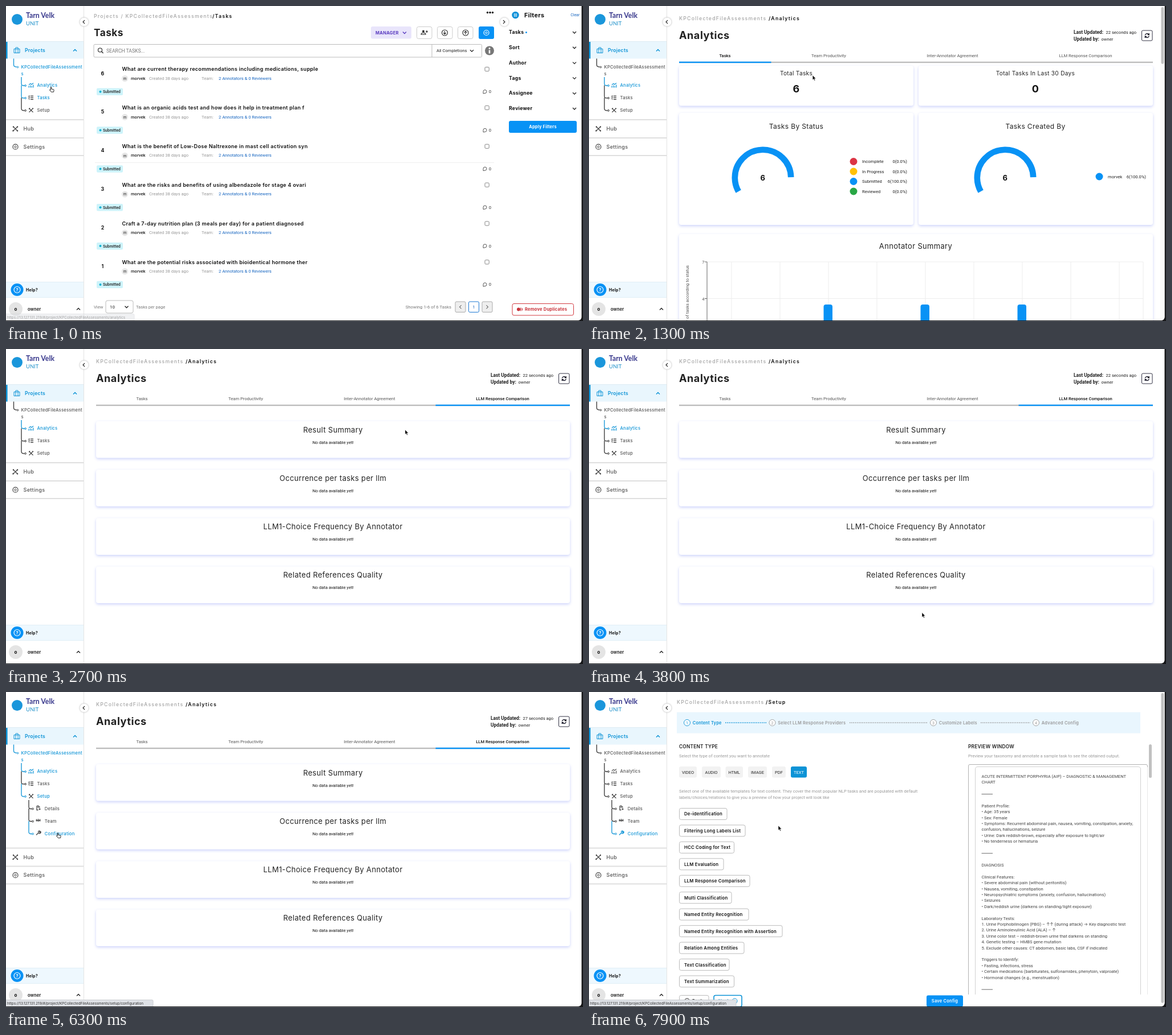
Animation of 1012 by 554 pixels, one loop 8000 ms. Source, as an HTML page:

```html
<!DOCTYPE html>
<html lang="en">
<head>
<meta charset="utf-8">
<title>Project analytics</title>
<style>
html, body { margin: 0; width: 100%; height: 100%; overflow: hidden; background: #17181a; }
svg { display: block; }
.m { font-family: Inter, sans-serif; letter-spacing: .03em; }
.r { font-family: Roboto, Inter, sans-serif; }
.l { font-family: Lato, sans-serif; }
.b { font-family: Inter, sans-serif; letter-spacing: 1.25px; font-size: 8.7px; }
.card { fill: #fff; filter: drop-shadow(0 2px 2.5px #ccd2fb); }
.blur { filter: blur(.9px); }
</style>
</head>
<body>
<svg id="stage" width="1012" height="554" viewBox="0 0 1012 554"></svg>
<script>
const PROJECT = 'KPCollectedFileAssessments', USER = 'morvek', OWNER = 'owner';
const BLUE = '#0892f5', LINK = '#0d93d6', INK = '#222', GREY = '#555', PALE = '#999';
const clamp = v => Math.max(0, Math.min(1, v));
const ease = v => v * v * (3 - 2 * v);

// y is the middle of the capitals
const text = cls => (x, y, s, size = 7.6, fill = INK, weight = 400, anchor = 'start') =>
  `<text class="${cls}" x="${x}" y="${y + size * .36}" font-size="${size}" fill="${fill}" font-weight="${weight}" text-anchor="${anchor}">${s}</text>`;
const M = text('m'), R = text('r'), L = text('l');
const box = (x, y, w, h, fill = '#fff', stroke = 'none', rx = 3, sw = 1) =>
  `<rect x="${x}" y="${y}" width="${w}" height="${h}" rx="${rx}" fill="${fill}" stroke="${stroke}" stroke-width="${sw}"/>`;
const dot = (x, y, r, fill, stroke = 'none', sw = 1) =>
  `<circle cx="${x}" cy="${y}" r="${r}" fill="${fill}" stroke="${stroke}" stroke-width="${sw}"/>`;
const line = (d, c = INK, w = 1, x = 0, y = 0, more = '') =>
  `<path d="${d}" fill="none" stroke="${c}" stroke-width="${w}" transform="translate(${x} ${y})" ${more}/>`;
const chevron = (x, y, turn = 0, c = INK, w = 1.3) =>
  `<path d="M-3-1.5 0 1.5 3-1.5" fill="none" stroke="${c}" stroke-width="${w}" transform="translate(${x} ${y}) rotate(${turn})"/>`;
const card = (x, y, w, h) => `<rect class="card" x="${x}" y="${y}" width="${w}" height="${h}" rx="4"/>`;
const list = (items, f) => items.map(f).join('');
const crumb = (x, y, path, nowX, now) =>
  `<text class="b" y="${y + 3.1}" font-weight="500"><tspan x="${x}" fill="#a5a5a5">${path}</tspan><tspan x="${nowX}" fill="#111" font-weight="600">/${now}</tspan></text>`;
const roundButton = (x, turn) =>
  `<circle cx="${x}" cy="28" r="7.5" fill="#fff" style="filter:drop-shadow(0 0 1.5px #aaa)"/>` + chevron(x - .5, 28, turn, INK, 1.1);

const ICONS = {
  bag: 'M-5-2.5h10v7h-10zM-2-2.5v-2.5h4v2.5M-2-2.5v7M2-2.5v7',
  chart: 'M-4 4v-3M-1.3 4v-4M1.3 4v-3M4 4v-5M-4-1-1-3 1-1.5 4-4',
  tasks: 'M-1-3h5M-1 0h5M-1 3h5M-4.5-3l.8.8 1.2-1.6M-4.5 0l.8.8 1.2-1.6M-4 3h1.3',
  tools: 'M-3.5-3.5 3.5 3.5M3.5-3.5-3.5 3.5M-4-2l2-2M2.5-4 4-2.5',
  hub: 'M0 0-3.5-3.5M0 0 3.5-3.5M0 0-4 3.5M0 0 3.5 3.5M-1 0h2',
  file: 'M-2.5-3.5h3l2 2v1M-2.5-3.5v7h2.5M-1-1h2M1 2h3M2.5.5v3',
  team: 'M-3-2.5v4M0-3v5M3-2.5v4M-4 0h8',
  wrench: 'M-3.5 3.5 1-1M0-1.5A2 2 0 0 1 3-3.5L2-2 3-1 4.2-2.5A2 2 0 0 1 1 0',
  sync: 'M-3.5-.5A3.5 3.5 0 0 1 2.8-2M3.5-4v2.5h-2.5M3.5.5A3.5 3.5 0 0 1-2.8 2M-3.5 4v-2.5h2.5',
};
const icon = (name, x, y, c = GREY, w = 1.2) => line(ICONS[name], c, w, x, y);
const gear = (x, y, c) => dot(x, y, 4.5, 'none', c, 1.2) + dot(x, y, 1.7, 'none', c);

const TITLES = [
  'What are current therapy recommendations including medications, supple',
  'What is an organic acids test and how does it help in treatment plan f',
  'What is the benefit of Low-Dose Naltrexone in mast cell activation syn',
  'What are the risks and benefits of using albendazole for stage 4 ovari',
  'Craft a 7-day nutrition plan (3 meals per day) for a patient diagnosed',
  'What are the potential risks associated with bioidentical hormone ther'];

function taskRow(title, i) {
  const y = 111 + 67.85 * i;
  return M(169.5, y + 7.5, 6 - i, 8.7, '#111', 700, 'middle') + M(203.5, y, title, 9.08, '#111', 600) +
    dot(208.5, y + 16.5, 5.5, '#e6e6e6') + R(208.5, y + 16.5, USER[0], 6.5, INK, 400, 'middle') +
    R(219, y + 16, USER, 7.6, INK, 500) + R(251, y + 16, 'Created 38 days ago', 7.6, PALE) +
    R(343, y + 16, 'Team:', 7.6, PALE) + R(373, y + 16, '2 Annotators &amp; 0 Reviewers', 7.6, '#1565c0') +
    box(159, y + 33.5, 46, 12.5, '#cdf3fa', 'none', 2) + dot(165.5, y + 39.7, 2, '#10b3d4') +
    R(170, y + 39.7, 'Submitted', 6.7, INK, 500) + box(840, y - 3.5, 7.2, 7.2, '#fff', '#666', 1.5, .8) +
    line('M-3 3.3v-3.5a3 3 0 1 1 3 3z', '#444', .9, 840, y + 39.7) + R(847, y + 39.7, '0', 7);
}

function tasksPage() {
  return crumb(154, 17.5, 'Projects / ' + PROJECT, 362, 'Tasks') + M(154, 47, 'Tasks', 17.2, INK, 700) +
    list([844.5, 849, 853.5], x => dot(x, 11.5, 1.7, '#111')) +
    box(640, 36, 71, 21.5, '#e9e5fb') + M(648, 46.8, 'MANAGER', 7.6, '#5a3cc0', 700) + chevron(699, 47, 0, '#5a3cc0') +
    list([720.5, 756.5, 792.5], x => box(x, 36.5, 26.5, 21, '#fff', '#ccc')) +
    dot(732, 44.5, 2, INK) + line('M-4 4a4 3 0 0 1 8 0zM4-1h4M6-3v4', INK, 1.2, 732, 46) +
    list([[769.5, 0], [806, 180]], ([x, a]) => dot(x, 47, 5, 'none', INK, 1.1) +
      line('M0-3v5.5M-2.5.2 0 2.7 2.5.2', INK, 1.1, x, 47, `style="transform:translate(${x}px,47px) rotate(${a}deg)"`)) +
    box(829, 36, 27, 22, BLUE) + gear(842.5, 47, '#fff') +
    box(154, 67.5, 680.5, 22.5, '#fff', '#bbb', 2) + line('M747 67.5v22.5', '#bbb') +
    dot(165, 77.5, 3.5, 'none', INK, 1.1) + line('M167.5 80l3 3', INK, 1.2) +
    R(176, 78.7, 'SEARCH TASKS...', 8.6, '#777') + R(755, 78.7, 'All Completions') + chevron(817, 78.7) +
    dot(848, 78.5, 8, '#777') + box(846.7, 77.5, 2.6, 6, '#fff', 'none', 0) + dot(848, 74.5, 1.5, '#fff') +
    line('M156 275.5H856', '#eee') + list(TITLES, taskRow) +
    R(154, 529, 'View', 7.6, '#777') + box(175, 518, 48, 22, '#fff', '#bbb') + R(182, 529, '10', 8) + chevron(211.5, 529.3) +
    R(228, 529, 'Tasks per page', 7.6, '#777') + R(781, 529, 'Showing 1-6 of 6 Tasks', 7.8, '#777', 400, 'end') +
    list([[788, '#eee', '#aaa'], [811.5, '#fff', '#1976d2'], [835, '#eee', '#aaa']], ([x, f, s]) => box(x, 520, 18, 18.5, f, s, 2)) +
    chevron(797, 529.3, 90, INK, 1) + R(820.5, 529.3, '1', 8, '#1565c0', 400, 'middle') + chevron(844, 529.3, -90, INK, 1) +
    roundButton(874, -90) + dot(893.5, 16, 6.2, '#0a8fd8') + line('M-2-3v6M0-3v6M2-3v6', '#fff', .9, 893.5, 16) +
    M(909, 16, 'Filters', 10.8, '#111', 700) + R(1006, 16, 'Clear', 6.8, '#1565c0', 400, 'end') +
    list(['Tasks', 'Sort', 'Author', 'Tags', 'Assignee', 'Reviewer'], (s, i) =>
      M(882, 46 + 26.8 * i, s, 8.7, '#111', 700) + chevron(997, 46.5 + 26.8 * i)) +
    dot(912.5, 46.5, 1.4, BLUE) + box(882, 202, 119, 21, BLUE) + M(941.5, 212.5, 'Apply Filters', 7.4, '#fff', 700, 'middle') +
    box(888, 523.5, 107.5, 20.5, '#fff', '#d23a40') + dot(899, 533.5, 3, '#c9323a') +
    line('M903 530.5v6M905.5 531.5v4', '#c9323a', 1.2) + M(910, 533.7, 'Remove Duplicates', 7.5, '#c9323a', 700);
}

const TABS = [['Tasks', 238.5], ['Team Productivity', 420.5], ['Inter-Annotator Agreement', 637.5], ['LLM Response Comparison', 871]];

function analyticsHead(active, y = 87.5) {
  return crumb(158, 21.5, PROJECT, 315, 'Analytics') + M(158, 51.3, 'Analytics', 18.1, INK, 700) +
    list(TABS, ([s, x], i) => R(x, y, s, 7.6, i == active ? '#111' : GREY, i == active ? 500 : 400, 'middle')) +
    box(158, y + 10.3, 831, 2.4, '#bcbcbc', 'none', 0) +
    (active ? box(753.5, y + 10.3, 235.5, 2.4, BLUE, 'none', 0) : box(158, y + 10.3, 161.5, 2.4, BLUE, 'none', 0));
}

function updated(t) {
  return R(850, 45.5, 'Last Updated:', 8.4, INK, 700) + R(906.5, 45.8, `${t < 5800 ? 22 : 27} seconds ago`) +
    R(850, 58, 'Updated by:', 8.4, INK, 700) + R(898.5, 58, OWNER) +
    box(969.5, 43, 18.5, 18, '#fff', '#334', 2) + icon('sync', 978.8, 52, '#112', 1.3);
}

function loadingPage() {
  return analyticsHead(0, 86.5) + card(158, 186, 831, 84.5) + '<g class="blur">' +
    M(573, 165, 'Label Frequency', 8.5, INK, 600, 'middle') + M(573, 228, 'Tasks Summary', 12.4, GREY, 500, 'middle') +
    M(573, 253.5, 'No matching data found', 12.5, GREY, 500, 'middle') + R(927, 201.5, 'Select Annotator', 6.2, GREY) +
    chevron(980, 201, 0, '#888', 1) + '</g>' + list([562, 570.5, 578.8], x => box(x, 194, 6, 8.2, '#0d86c8', 'none', 0));
}

const STATUS = [['Incomplete', '0(0.0%)', '#dc3545'], ['In Progress', '0(0.0%)', '#ffc107'],
  ['Submitted', '6(100.0%)', BLUE], ['Reviewed', '0(0.0%)', '#28a745']];

const donut = (x, p) => `<circle r="49.2" pathLength="100" fill="none" stroke="${BLUE}" stroke-width="10.6"
  stroke-dasharray="${99.35 * p} 100" transform="translate(${x} 302) scale(1 -1) rotate(1)"/>` +
  M(x, 302, '6', 13, '#111', 700, 'middle');

function statsPage(t) {
  const p = ease(clamp((t - 800) / 900));
  return card(158, 105, 411, 70.5) + card(578, 105, 411, 70.5) + analyticsHead(0) + updated(t) +
    M(363.5, 118.5, 'Total Tasks', 10.1, INK, 400, 'middle') + M(363.5, 146, '6', 18, '#111', 700, 'middle') +
    M(783, 118.5, 'Total Tasks In Last 30 Days', 10.1, INK, 400, 'middle') + M(783, 146, '0', 18, '#111', 700, 'middle') +
    card(158, 188, 411, 197) + card(578, 188, 411, 197) +
    M(363.5, 212, 'Tasks By Status', 12, INK, 400, 'middle') + M(783, 212, 'Tasks Created By', 12, INK, 400, 'middle') +
    donut(305, p) + donut(730, p) +
    list(STATUS, ([s, n, c], i) => dot(464, 273.5 + 17.5 * i, 6.5, c) + R(479, 273.5 + 17.5 * i, s) +
      R(558, 273.5 + 17.5 * i, n, 7.6, INK, 400, 'end')) +
    dot(895, 300, 6.5, BLUE) + R(910, 300, USER) + R(977, 300, '6(100.0%)', 7.6, INK, 400, 'end') +
    card(158, 401, 831, 170) + M(573, 422.5, 'Annotator Summary', 12.9, INK, 400, 'middle') +
    line('M207 450H972M207 514.5H972' + list([...Array(9).keys()], i => `M${250 + 85 * i} 450V554`) + 'M972 450V554', '#ededed') +
    line('M203 450h4V554M203 514.5h4', '#666') +
    R(202.5, 450.3, '7', 7.6, GREY, 400, 'end') + R(202.5, 514.8, '4', 7.6, GREY, 400, 'end') +
    list([411.5, 581.5, 751.5], x => box(x, 600 - 128.7 * p, 15.5, 140, BLUE, 'none', 4)) +
    `<g transform="translate(172 456) rotate(-90)">${R(0, 0, 'Number of tasks according to status', 7.6, GREY, 400, 'end')}</g>`;
}

function comparisonPage(t) {
  return analyticsHead(3) + updated(t) +
    list(['Result Summary', 'Occurrence per tasks per llm', 'LLM1-Choice Frequency By Annotator', 'Related References Quality'], (s, i) => {
      const y = 127 + 85.2 * i;
      return card(158, y, 831, 64.5) + M(573.5, y + 15, s, 12.9, INK, 400, 'middle') +
        R(573.5, y + 37, 'No data available yet!', 7.6, '#111', 400, 'middle');
    });
}

const STEPS = [['Content Type', 172, 239, 312], ['Select LLM Response Providers', 321.5, 457, 594],
  ['Customize Labels', 604, 687, 774], ['Advanced Config', 784, 0, 0]];
const KINDS = [['VIDEO', 158, 31], ['AUDIO', 198, 33], ['HTML', 239.5, 30.5], ['IMAGE', 279, 33], ['PDF', 321, 24], ['TEXT', 354, 28]];
const TEMPLATES = [['De-identification', 242], ['Filtering Long Labels List', 274], ['HCC Coding for Text', 254.5],
  ['LLM Evaluation', 236], ['LLM Response Comparison', 282], ['Multi Classification', 250], ['Named Entity Recognition', 280],
  ['Named Entity Recognition with Assertion', 339], ['Relation Among Entities', 272], ['Text Classification', 246], ['Text Summarization', 254.5]];
const PREVIEW = `ACUTE INTERMITTENT PORPHYRIA (AIP) – DIAGNOSTIC &amp; MANAGEMENT
CHART

---

Patient Profile:
• Age: 35 years
• Sex: Female
• Symptoms: Recurrent abdominal pain, nausea, vomiting, constipation, anxiety,
confusion, hallucinations, seizure
• Urine: Dark reddish-brown, especially after exposure to light/air
• No tenderness or hematuria

---

DIAGNOSIS

Clinical Features:
• Severe abdominal pain (without peritonitis)
• Nausea, vomiting, constipation
• Neuropsychiatric symptoms (anxiety, confusion, hallucinations)
• Seizures
• Dark/reddish urine (darkens on standing/light exposure)

Laboratory Tests:
1. Urine Porphobilinogen (PBG) – ↑↑ (during attack) → Key diagnostic test
2. Urine Aminolevulinic Acid (ALA) – ↑
3. Urine color test – reddish-brown urine that darkens on standing
4. Genetic testing – HMBS gene mutation
5. Exclude other causes: CT abdomen, basic labs, CSF if indicated

Triggers to Identify:
• Fasting, infections, stress
• Certain medications (barbiturates, sulfonamides, phenytoin, valproate)
• Hormonal changes (e.g., menstruation)

---`.split('\n');

function previewLine(s, i) {
  const y = 148 + 10.41 * i;
  return s == '---' ? line('M0 0h19.5', '#444', .8, 688.5, y + .4) : R(688.5, y, s, 7.6, '#444');
}

function setupPage() {
  return crumb(154, 17.5, PROJECT, 310, 'Setup') + box(154, 35.5, 813, 37, '#e9f6fe', 'none', 0) +
    list(STEPS, ([s, x, from, to], i) => {
      const c = i ? PALE : LINK;
      return dot(x, 54, 5.5, '#fff', c, .9) + R(x, 54, i + 1, 7, c, 400, 'middle') + M(x + 9.8, 54, s, 7.4, c, 600) +
        (to ? line(`M${from} 54H${to}`, c, 1.5, 0, 0, 'stroke-dasharray="1.6 1.6"') : '');
    }) +
    M(158, 96, 'CONTENT TYPE', 8.3, INK, 600) + R(158, 112.5, 'Select the type of content you want to annotate', 7.6, PALE) +
    list(KINDS, ([s, x, w], i) => box(x, 131, w, 19.5, i == 5 ? LINK : '#f2f2f2') +
      R(x + w / 2, 141, s, 7.5, i == 5 ? '#fff' : INK, 400, 'middle')) +
    R(158, 174, 'Select one of the available templates for text content. They cover the most popular NLP tasks and are populated with default', 7.6, PALE) +
    R(158, 185, 'labels/choices/relations to give you a preview of how your project will look like', 7.6, PALE) +
    list(TEMPLATES, ([s, end], i) => box(158.5, 204.5 + 29.45 * i, end - 158.5, 20, '#fff', '#bbb') +
      M(167, 214.7 + 29.45 * i, s, 7.75, '#111', 600)) +
    box(158.5, 533.5, 51.5, 20, '#fff', '#bbb') + dot(172, 543.5, 4.5, 'none', INK) + M(181, 543.5, 'Back', 7.6, INK, 600) +
    box(219, 533.5, 49, 20, '#fff', LINK, 3, 1.6) + M(227, 543.5, 'Next', 7.6, LINK, 600) + dot(255.5, 543.5, 4.5, 'none', LINK) +
    box(592, 533.5, 64, 20, BLUE) + M(624, 543.7, 'Save Config', 7.5, '#fff', 600, 'middle') +
    M(665, 96, 'PREVIEW WINDOW', 8.3, INK, 600) +
    R(665, 112.5, 'Preview your taxonomy and annotate a sample task to see the obtained output.', 7.6, PALE) +
    line('M665.5 532V130q0-2.5 2.5-2.5H977q2.5 0 2.5 2.5V132', '#aaa', .9) +
    line('M677.5 532V136q0-4.5 4.5-4.5H963q4.5 0 4.5 4.5V532', '#ccc', .9) + line('M979.5 132V532', '#e8e8e8') +
    list(PREVIEW, previewLine) + box(982, 92, 5, 59, '#c1c1c1', 'none', 2.5);
}

// A branch is coloured together with the trunk piece above it
const branch = (x, from, y, c) => line(`M${x} ${from}V${y - 3}q0 3.5 4 3.5h1.5`, c, 1.3) + dot(x + 7, y + .5, 1.4, '#fff', c, 1);

function sidebar(t, hover) {
  const on = v => v ? LINK : GREY;
  const tree = v => v ? LINK : '#333';
  const open = ease(clamp((t - 5000) / 400)), drop = 74.5 * open;
  const items = [['Analytics', 'chart', t < 7100], ['Tasks', 'tasks', t < 300], ['Setup', 'tools', hover && t >= 5100]];
  const subs = [['Details', 'file', false], ['Team', 'team', false], ['Configuration', 'wrench', t >= 6100]];
  const rule = y => box(0, y - 1, 136, 2, '#dfdfdf', 'none', 0);
  return box(0, 0, 136, 553, '#fff', 'none', 0) + line('M136.5 0V553', '#e4e4e4') +
    dot(19.5, 23.5, 9.5, '#1a96db') + L(35, 17, 'Tarn Velk', 12.3, '#38388c', 700) + L(35, 30.3, 'UNIT', 9.4, '#1b8fc9') +
    roundButton(137, 90) +
    box(0, 62, 136, 30.5, '#e9f6fd', 'none', 0) + line('M0 62.5H136', '#dcebf3') + box(0, 63, 2.6, 29.5, LINK, 'none', 0) +
    icon('bag', 19, 78, LINK, 1) + M(33, 78, 'Projects', 8.6, LINK, 600) + chevron(121, 78, 180, LINK, 1.5) +
    line('M13.5 92.5V103q0 4 4 4h1', tree(hover), 1.3) + dot(20.5, 107.5, 1.3, '#fff', tree(hover)) +
    M(26.5, 107.3, PROJECT.slice(0, -1), 7.6, on(hover), 500) + M(26.5, 119, PROJECT.slice(-1), 7.6, on(hover), 500) +
    list(items, ([s, name, lit], i) => {
      const y = 139.5 + 21.9 * i;
      return branch(27, i ? y - 22 : 125, y, tree(lit)) + icon(name, 44, y, i ? '#333' : on(lit)) + M(54.5, y, s, 7.6, on(lit), 500);
    }) +
    `<clipPath id="fold"><rect y="190" width="136" height="${drop + 4 * open}"/></clipPath><g clip-path="url(#fold)">` +
    list(subs, ([s, name, lit], i) => {
      const y = 205 + 22 * i;
      return branch(40, i ? y - 22 : 190, y, tree(lit)) + icon(name, 56.5, y - 1, i == 2 && t >= 7100 ? LINK : '#444', 1.3) +
        M(67.8, y, s, 7.6, on(lit), 500);
    }) + '</g>' +
    `<g transform="translate(0 ${drop})">` + rule(200) + rule(232) + rule(263) +
    icon('hub', 16.5, 216, '#444') + list([[13, 212.5], [20, 212.5], [12.5, 219.5], [20, 219.5]], ([x, y]) => dot(x, y, 1.2, '#444')) +
    M(30.5, 216, 'Hub', 9.1, GREY, 500) + gear(16.5, 247.7, '#444') + M(30.5, 247.7, 'Settings', 9.1, GREY, 500) + '</g>' +
    box(0, 485, 136, 27.5, '#eef8fe', 'none', 0) + line('M0 485.5H136M0 512.5H136', '#e0eef6') +
    dot(19.5, 499, 11, BLUE) + dot(19.5, 499, 5.5, 'none', '#fff', 1.2) + M(19.6, 499, '?', 8, '#fff', 700, 'middle') +
    M(35, 499, 'Help?', 7.1, '#111', 700) + dot(17, 533, 12, '#e4e4e4') + M(17, 533, OWNER[0], 8, '#111', 700, 'middle') +
    M(38, 533, OWNER, 7.4, '#111', 600) + chevron(127, 533, 180);
}

function statusBar(t) {
  if (t >= 1200 && t < 6200) return '';
  const late = t >= 6200, w = late ? 258 : 225;
  const opacity = late ? 1 : Math.min(1, .45 + t / 300);
  return `<g opacity="${opacity}">` + box(-3, 541.5, w + 3, 15, '#dee1e6', '#c4c7cc', 2, .8) +
    `<text x="2" y="549.8" font-family="Inter, sans-serif" font-size="6.3" fill="#333">https://13.127.131.219/#/project/${PROJECT}/${late ? 'setup/configuration' : 'analytics'}</text></g>`;
}

const PATH = [[0, 79, 142], [900, 79, 142], [1800, 830, 93.5], [2300, 830, 93.5], [2700, 700, 142], [3100, 408, 165], [3400, 600, 298],
  [3600, 480, 230], [3800, 584, 463.5], [3900, 600, 488], [4000, 641, 447], [4100, 641, 447], [5000, 64, 181], [5700, 64, 181],
  [6200, 91, 247.5], [7400, 91, 247.5], [7900, 332, 235], [8000, 332, 235]];

function pointer(t) {
  const i = PATH.findIndex(k => k[0] > t), [t0, x0, y0] = PATH[i - 1], [t1, x1, y1] = PATH[i];
  const p = ease((t - t0) / (t1 - t0));
  return [x0 + (x1 - x0) * p, y0 + (y1 - y0) * p];
}

function cursor(t, x, y) {
  const hand = t < 1000 || t >= 1700 && t <= 2300 || t >= 4900 && t < 7500;
  const ring = t >= 2000 && t < 2300 ? dot(x + 1, y + .5, 17, 'none', INK, 1.3) : '';
  return ring + (hand
    ? `<path d="M-.8 1q.8-1.5 1.6 0v3l3.5.8q1 .3.8 1.4l-.6 3h-4.2l-2.8-3.5q0-1.2 1.7-.2z" fill="#fff" stroke="#111" stroke-width=".9" transform="translate(${x} ${y})"/>`
    : `<path d="M0 0v8.2l1.9-1.7 1.3 3 1.3-.6-1.3-2.9h2.5z" stroke="#fff" stroke-width=".5" transform="translate(${x} ${y})"/>`);
}

const PAGES = [[7600, setupPage], [7100, () => ''], [2200, comparisonPage], [850, statsPage], [300, loadingPage], [0, tasksPage]];

function scrollbar(t) {
  const full = t >= 7100;
  if (!full && (t < 850 || t >= 2200)) return '';
  return box(1002, 0, 8, 553, '#fafafa', 'none', 0) + box(1003.5, 2, 4.8, full ? 545 : 100, '#c1c1c1', 'none', 2.4);
}

function scene(t) {
  const [x, y] = pointer(t);
  const page = PAGES.find(p => t >= p[0])[1];
  return '<clipPath id="window"><rect x="-10" y="-10" width="1019.5" height="563" rx="6"/></clipPath><g clip-path="url(#window)">' +
    box(0, 0, 1012, 554, '#fff', 'none', 0) + page(t) + scrollbar(t) + sidebar(t, x < 136) + statusBar(t) + '</g>' + cursor(t, x, y);
}

const stage = document.getElementById('stage');
let shown = -1;
function tick() {
  const t = Math.floor(performance.now() % 8000 / 100) * 100;
  if (t !== shown) stage.innerHTML = scene(shown = t);
  requestAnimationFrame(tick);
}
tick();
</script>
</body>
</html>
```
